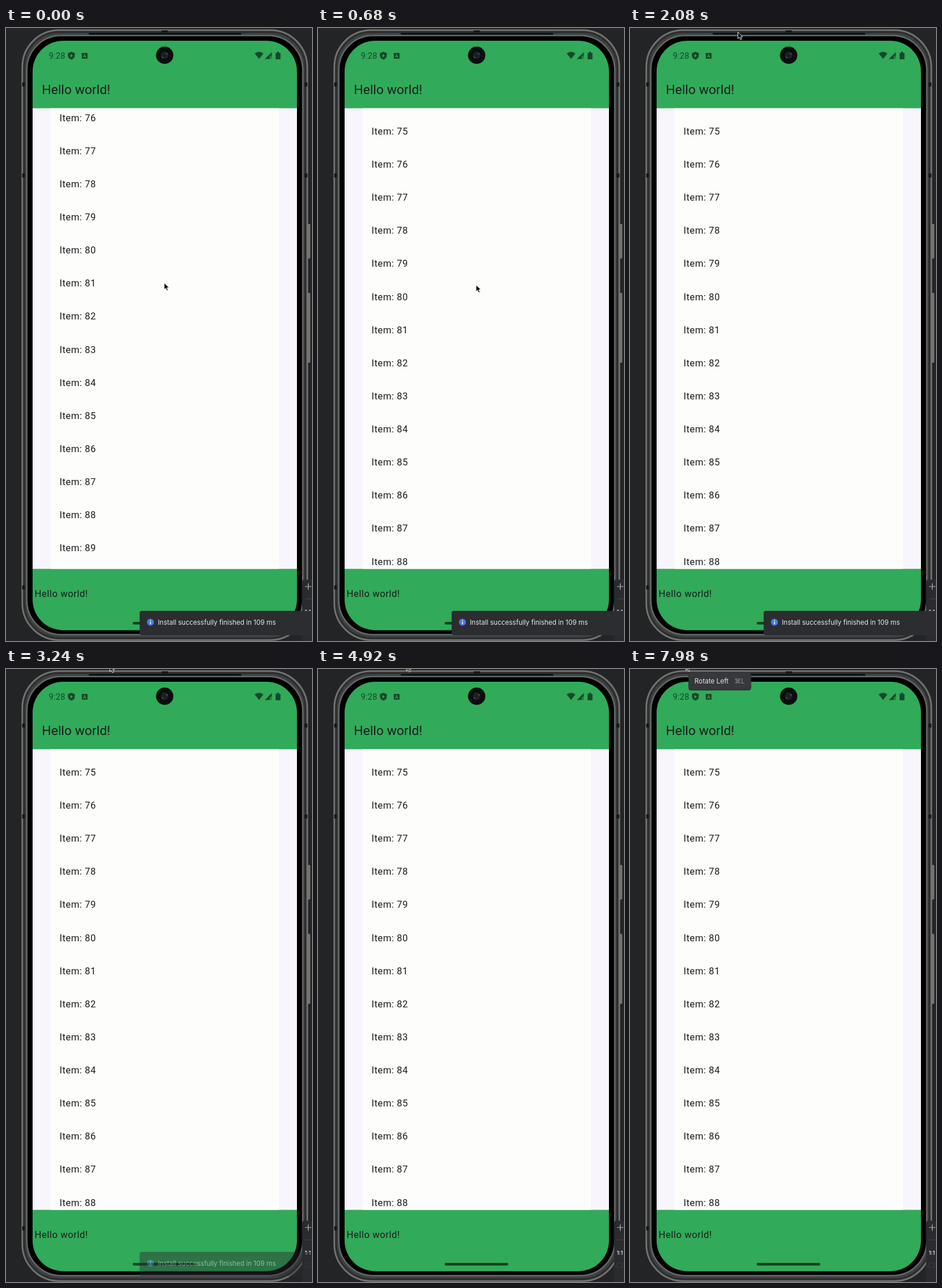
Recreate the animation shown at these times as an HTML page. Size 529x1058 px, loop 8 s.

```html
<!DOCTYPE html>
<html lang="en">
<head>
<meta charset="utf-8">
<title>Scrolling list</title>
<style>
  html, body { margin: 0; width: 100%; height: 100%; overflow: hidden; background: #222426; }
  svg { display: block; width: 100%; height: 100%; }
  text { white-space: pre; }
  .app { font-family: Roboto, sans-serif; fill: #1a1c1d; }
  .body { font-size: 16.32px; letter-spacing: .51px; }
  .ide { font: 11.5px Inter, "DejaVu Sans", sans-serif; fill: #e6e8ec; }
</style>
</head>
<body>
<svg viewBox="0 0 529 1058">
  <defs>
    <clipPath id="screen"><rect x="46" y="22" width="457" height="1017.4" rx="53"/></clipPath>
    <clipPath id="list"><rect x="46" y="138.6" width="457" height="794.9"/></clipPath>
  </defs>

  <!-- Device shell -->
  <g fill="#77736c">
    <rect x="519" y="338" width="7" height="60" rx="2"/>
    <rect x="519" y="457" width="7" height="121" rx="2"/>
  </g>
  <g fill="none" stroke-width="2.5">
    <rect x="28" y="3.5" width="493" height="1053" rx="64" fill="#3f4041" stroke="#757573"/>
    <rect x="31.5" y="7" width="486" height="1046" rx="61" stroke="#2a2b2c"/>
    <rect x="36" y="13" width="477" height="1034" rx="59" fill="#000" stroke="#676765"/>
  </g>
  <rect x="143" y="8.5" width="264" height="3" rx="1.5" fill="#0d0d10"/>
  <g id="bands" fill="#17181a"><rect x="269" y="4" width="11" height="4"/></g>

  <!-- App -->
  <g clip-path="url(#screen)">
    <rect x="46" y="22" width="457" height="1018" fill="#31aa59"/>
    <g clip-path="url(#list)">
      <rect x="46" y="138" width="457" height="796" fill="#f8f5fc"/>
      <rect x="77" y="138" width="395" height="796" fill="#fdfdfb"/>
      <g id="rows" class="app body"></g>
    </g>
    <text class="app" x="62" y="113.7" font-size="22.44">Hello world!</text>
    <text class="app body" x="49.5" y="981.8">Hello world!</text>
    <rect x="219" y="1025" width="110" height="4.4" rx="2.2" fill="#123f20"/>
    <g fill="#17492a">
      <text x="74" y="52.7" font-family="Roboto, sans-serif" font-size="14.3" letter-spacing=".2">9:28</text>
      <path d="M113 41l6 2.2v4.2c0 3.4-2.5 6-6 7.2-3.5-1.2-6-3.8-6-7.2v-4.2z"/>
      <rect x="131" y="43" width="10" height="10" rx="1.2"/>
      <path d="M430 44q7.5-6 15 0l-7.500 9.5z"/>
      <path d="M459.5 41.5v12h-12zM466 43h2.5v-2h3.5v2h2.5v11h-8.5z"/>
    </g>
    <path d="M111.5 45v5.5l4-2.75z" fill="#31aa59"/>
    <path d="M134 51l2-5.5 2 5.5M134.8 49.5h2.4" fill="none" stroke="#31aa59"/>
    <path d="M456.5 48v6h4v-6z" fill="#31aa59"/>
    <path d="M458.5 48.5v3M458.5 52.5v1" stroke="#17492a" stroke-width="1.5"/>
  </g>
  <circle cx="274.3" cy="47" r="15" fill="#0b0e10"/>
  <circle cx="274.3" cy="47" r="6.5" fill="#1b2125"/>
  <path d="M276 43.5h3v3zM269.5 48.5v3h3z" fill="#566067"/>

  <!-- Zoom controls -->
  <path d="M529 952h-13q-4 0-4 4v102h17z" fill="#292b2e"/>
  <path d="M517 964h11M522.5 958.5v11" stroke="#b6b8bc" stroke-width="1.2"/>
  <path d="M517 985.5h12" stroke="#44474b"/>
  <text class="ide" x="516.5" y="1010.5" style="font-size:9px;font-weight:600">1:1</text>
  <path d="M517 1025v8h9v-8z" fill="none" stroke="#3c3e41"/>

  <g id="toast">
    <path d="M529 1006H235q-4 0-4 4v34q0 4 4 4h294z" fill="#2b2d30"/>
    <circle cx="249.7" cy="1025.5" r="6" fill="#4a78e8"/>
    <path d="M249.7 1022v1.5M249.7 1024.7v4.3" stroke="#fff" stroke-width="1.5"/>
    <text class="ide" x="262.5" y="1029.8">Install successfully finished in 109 ms</text>
  </g>

  <g id="tip">
    <rect x="101.5" y="5.5" width="107.5" height="31" rx="4" fill="#36383c" stroke="#2c2e31"/>
    <text class="ide" x="111.5" y="24.8">Rotate Left</text>
    <text class="ide" x="180.5" y="24.8" style="fill:#8c8f94">⌘L</text>
  </g>

  <path id="cursor" d="M0 0V11.5L2.7 9 4.5 13.3 6.6 12.4 4.8 8.2H8.3Z" fill="#080808" stroke="#f4f4f4" stroke-width=".9"/>
</svg>
<script>
  const LOOP = 8000, PITCH = 57.14, SCROLL = 80.7;
  const $ = id => document.getElementById(id);
  const clamp = x => Math.min(1, Math.max(0, x));
  const smooth = x => x * x * (3 - 2 * x);

  // Pointer stops: time, x, y
  const stops = [
    [0, 273.5, 440], [500, 273.3, 443.5], [1100, 273.3, 443.5], [1900, 186.5, 7],
    [2300, 186.5, 7], [3100, 179.5, -7], [4100, 179, -7.5], [4800, 153, -8],
    [5500, 153, -8], [6300, 99, -8], [7000, 96.5, -9], [LOOP, 96.5, -9]
  ];

  $('rows').innerHTML = Array.from({ length: 18 }, (_, i) =>
    `<text x="92.5" y="${(183.8 + (i - 1) * PITCH).toFixed(2)}">Item: ${74 + i}</text>`).join('');
  $('bands').innerHTML += [97, 254, 965].map(y =>
    `<rect x="28" y="${y - 3}" width="5" height="7"/><rect x="516" y="${y - 3}" width="5" height="7"/>`).join('');

  function pointer(t) {
    const i = stops.findIndex((s, n) => n && t <= s[0]);
    const [t0, x0, y0] = stops[i - 1], [t1, x1, y1] = stops[i];
    const k = smooth((t - t0) / (t1 - t0));
    return [x0 + (x1 - x0) * k, y0 + (y1 - y0) * k];
  }

  function draw(now) {
    const t = now % LOOP;
    const shift = -SCROLL * (1 - clamp(t / 600)) ** 3;
    $('rows').setAttribute('transform', `translate(0 ${shift.toFixed(2)})`);
    $('cursor').setAttribute('transform', `translate(${pointer(t)})`);
    $('toast').setAttribute('opacity', 1 - clamp((t - 3000) / 430));
    $('tip').setAttribute('visibility', t >= 7500 ? 'visible' : 'hidden');
  }

  const start = performance.now();
  function tick() {
    draw(performance.now() - start);
    requestAnimationFrame(tick);
  }
  tick();
</script>
</body>
</html>
```
